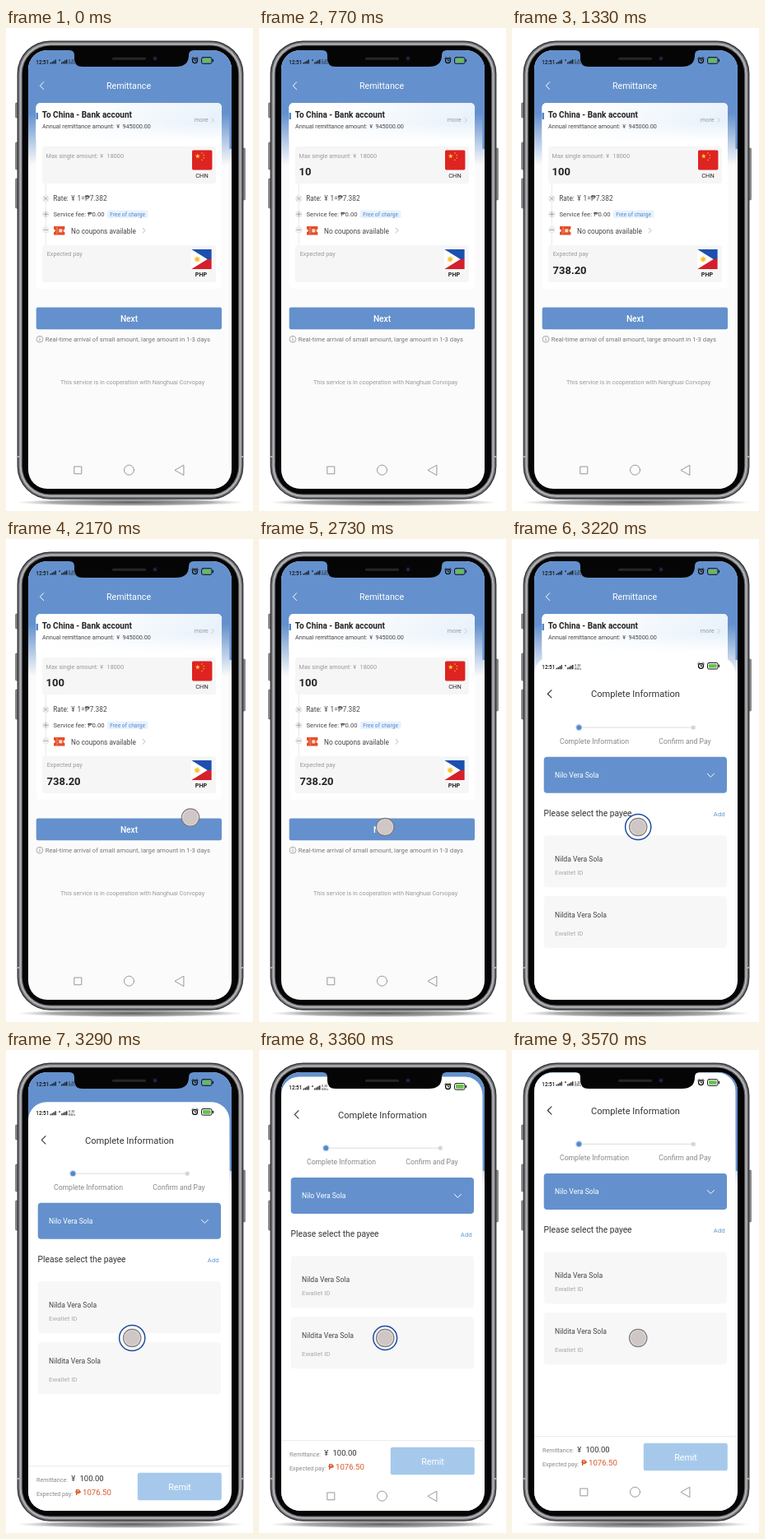
Recreate the animation shown at these times as an HTML page. Size 300 by 587 pixels, loop 7000 ms.

```html
<!DOCTYPE html>
<html lang="en">
<head>
<meta charset="utf-8">
<title>Remittance</title>
<style>
  html, body { margin: 0; width: 100%; height: 100%; overflow: hidden; background: #fff; }
  svg { display: block; width: 100vw; height: 100vh; }
  text { font-family: Roboto, "Noto Sans", sans-serif; font-size: 7.25px; fill: #444; white-space: pre; }
  .b { font-weight: 700; }
  .m { font-weight: 500; }
  .c { text-anchor: middle; }
  .w { fill: #fff; }
  .g { fill: #999; }
  .amount { font-size: 13px; font-weight: 700; fill: #222; }
  .row { font-size: 8.25px; }
  .step { font-size: 8.65px; fill: #888; }
  .name { font-size: 8.6px; }
  .id { font-size: 7.9px; fill: #aaa; }
  .sum { font-size: 9.5px; fill: #333; }
  .due { font-size: 9.6px; fill: #d9582b; }
  .line { fill: none; stroke-linecap: round; stroke-linejoin: round; }
</style>
</head>
<body>
<svg viewBox="0 0 300 587">
  <defs>
    <clipPath id="screen"><rect x="27" y="27" width="247" height="533" rx="23"/></clipPath>
    <linearGradient id="sky" x1="0" x2="0" y1="0" y2="1">
      <stop offset="0" stop-color="#6491cd"/><stop offset=".55" stop-color="#6491cd"/>
      <stop offset="1" stop-color="#fbfbfb"/>
    </linearGradient>
    <linearGradient id="tint" x1="0" x2="1" y1="0" y2=".25">
      <stop offset=".25" stop-color="#fff"/><stop offset="1" stop-color="#e9f2fb"/>
    </linearGradient>
    <linearGradient id="fade" x1="0" x2="0" y1="0" y2="1">
      <stop offset=".3" stop-color="#fff" stop-opacity="0"/><stop offset="1" stop-color="#fff"/>
    </linearGradient>
    <radialGradient id="shade">
      <stop offset="0" stop-color="#444" stop-opacity=".85"/><stop offset=".7" stop-color="#666" stop-opacity=".55"/>
      <stop offset="1" stop-color="#999" stop-opacity="0"/>
    </radialGradient>

    <g id="status">
      <text x="36.3" y="43.5" class="m" style="font-size:6.3px;fill:#111">12:51</text>
      <path d="M54.2 43.5v-1.6M56.2 43.5v-2.6M58.2 43.5v-3.8M60.2 43.5v-5M67.8 43.5v-2M69.8 43.5v-3M71.8 43.5v-4.2M73.8 43.5v-5.2M65 38.3v1.8" stroke="#111" stroke-width="1.3"/>
      <text x="76" y="40.6" style="font-size:3.8px;fill:#222">0.20</text>
      <text x="76" y="44" style="font-size:3.8px;fill:#222">KB/s</text>
      <g class="line" stroke="#111">
        <circle cx="229.5" cy="39.6" r="3" stroke-width="1.3"/>
        <path d="M229.5 38v1.8h1.2M225.7 37l1.6-1.5M233.3 37l-1.6-1.5" stroke-width="1"/>
        <rect x="237.5" y="35.7" width="12.5" height="7.6" rx="1.8" stroke-width="1"/>
        <path d="M251.4 38.4v2.2" stroke-width="1.2"/>
      </g>
      <rect x="239" y="37.2" width="9.5" height="4.6" rx=".6" fill="#67c04c"/>
    </g>
    <g id="nav" class="line" stroke="#8d8d8d" stroke-width=".9">
      <rect x="83.2" y="533" width="8.6" height="8.8"/>
      <circle cx="149.5" cy="537.2" r="6"/>
      <path d="M205.3 537.2l10.6-6v12z"/>
    </g>
    <path id="star" d="M0-1L.225-.309.951-.309.363.118.588.809 0 .382-.588.809-.363.118-.951-.309-.225-.309z"/>
  </defs>

  <ellipse cx="151" cy="576.5" rx="139" ry="4.6" fill="url(#shade)"/>
  <g fill="#8a8a8a" stroke="#555" stroke-width=".5">
    <rect x="11.5" y="91" width="3.5" height="18" rx="1"/>
    <rect x="11.5" y="139" width="3.5" height="33" rx="1"/>
    <rect x="11.5" y="183" width="3.5" height="36" rx="1"/>
    <rect x="286.5" y="146" width="4" height="63" rx="1"/>
  </g>
  <g id="body"></g>
  <path d="M13.6 521h4M284 521h4" stroke="#aaa" stroke-width="2"/>

  <g clip-path="url(#screen)">
    <rect x="27" y="27" width="247" height="533" fill="#fbfbfb"/>
    <rect x="27" y="27" width="247" height="140" fill="url(#sky)"/>
    <path d="M271.5 29h2.5v118h-2.5z" fill="#6491cd"/>
    <use href="#status"/>
    <path class="line" d="M45.6 65.8l-4.2 4.4 4.2 4.4" stroke="#fff" stroke-width="1"/>
    <text x="149" y="74.3" class="c w" style="font-size:10.7px">Remittance</text>

    <rect x="36.5" y="91.2" width="225.5" height="225.8" rx="5" fill="#fff"/>
    <rect x="36.5" y="91.2" width="225.5" height="45" rx="5" fill="url(#tint)"/>
    <rect x="36.5" y="106" width="225.5" height="31" fill="url(#fade)"/>
    <rect x="36.5" y="103" width="2.5" height="8" fill="#5685c8"/>
    <text x="43.8" y="109.2" class="b" style="font-size:10px;fill:#222">To China - Bank account</text>
    <text x="44" y="122.3">Annual remittance amount:</text>
    <text x="134.2" y="122.3">¥</text><text x="141.4" y="122.3">945000.00</text>
    <text x="228.7" y="114.3" class="g" style="font-size:7.4px">more</text>
    <path class="line" d="M250 109.3l2.4 2.6-2.4 2.6" stroke="#bbb" stroke-width=".7"/>

    <path d="M48.3 188v76" stroke="#e3e3e3" stroke-width=".8"/>
    <g fill="#f6f6f6">
      <rect x="44" y="144" width="211" height="45" rx="3"/>
      <rect x="44" y="264" width="211" height="45" rx="3"/>
    </g>
    <text x="48.6" y="158.3" class="g">Max single amount:</text>
    <text x="114.2" y="158.3" class="g">¥</text><text x="122.6" y="158.3" class="g">18000</text>
    <text id="typed" x="48.6" y="179.3" class="amount"></text>
    <rect x="226" y="148.4" width="24.4" height="24" rx="1.6" fill="#dd2421"/>
    <g fill="#fbd433">
      <use href="#star" transform="translate(232.8 155.8) scale(3.2)"/>
      <use href="#star" transform="translate(238 152) scale(1.1)"/>
      <use href="#star" transform="translate(240.3 154.5) scale(1.1)"/>
      <use href="#star" transform="translate(240.2 157.9) scale(1.1)"/>
      <use href="#star" transform="translate(237.9 160.4) scale(1.1)"/>
    </g>
    <text x="238" y="182" class="c" style="font-size:7.4px;fill:#222">CHN</text>

    <g fill="#f1f1f1" stroke="#ddd" stroke-width=".5">
      <circle cx="48.3" cy="207.3" r="3.8"/><circle cx="48.3" cy="226.3" r="3.8"/><circle cx="48.3" cy="245.3" r="3.8"/>
    </g>
    <path class="line" d="M46.5 205.5l3.6 3.6m0-3.6l-3.6 3.6M45.7 226.3h5.2m-2.6-2.6v5.2M45.9 245.3h4.8" stroke="#888" stroke-width=".7"/>
    <text x="57.2" y="210.4" class="row">Rate:</text>
    <text x="79.3" y="210.4" class="row">¥</text><text x="86.6" y="210.4" class="row">1=₱7.382</text>
    <text x="57.5" y="228.8" style="font-size:7.7px">Service fee: ₱0.00</text>
    <rect x="123" y="221.4" width="49.5" height="9.6" rx="1.5" fill="#e8f2fc"/>
    <text x="126.3" y="228.6" style="font-size:6.7px;fill:#5189d0">Free of charge</text>
    <path d="M58 241h13.4v3.4a1.7 1.7 0 0 0 0 3.6v3.6H58V248a1.7 1.7 0 0 0 0-3.6z" fill="#e44d27"/>
    <path d="M62 242.3v8" stroke="#fff" stroke-width=".7" stroke-dasharray="1.4 1"/>
    <rect x="64.3" y="244.3" width="4" height="4" fill="#fbd9c9"/>
    <text x="79" y="249.5" class="row">No coupons available</text>
    <path class="line" d="M166.2 243.2l2.8 3-2.8 3" stroke="#aaa" stroke-width=".8"/>

    <text x="49.7" y="277.3" class="g">Expected pay</text>
    <text id="total" x="49.5" y="299.4" class="amount">738.20</text>
    <rect x="225" y="269" width="24.6" height="24" rx=".8" fill="#fff"/>
    <path d="M225.3 269h24.3v12h-5z" fill="#1c4fae"/>
    <path d="M225.3 293h24.3v-12h-5z" fill="#d4202b"/>
    <circle cx="232.2" cy="281" r="2.6" fill="#f6c431"/>
    <path d="M232.2 276.8v8.4M228 281h8.4M229.2 278l6 6m0-6l-6 6" stroke="#f6c431" stroke-width=".7"/>
    <text x="237" y="302" class="c b" style="font-size:7.2px;fill:#222">PHP</text>

    <rect x="36.7" y="339.4" width="225.3" height="26.8" rx="2.2" fill="#6491cd"/>
    <text x="149.5" y="356.7" class="c m w" style="font-size:10.2px">Next</text>
    <circle cx="41" cy="378.2" r="3.9" fill="none" stroke="#888" stroke-width=".7"/>
    <path d="M41 377.4v3M41 375.6v.9" stroke="#888" stroke-width=".8"/>
    <text x="47.8" y="381" style="font-size:7.7px;fill:#777">Real-time arrival of small amount, large amount in 1-3 days</text>
    <text x="66" y="433.3" class="g" style="font-size:7.3px">This service is in cooperation with Nanghuai Corvopay</text>
    <use href="#nav"/>

    <g id="sheet">
      <path d="M27 560V49.5a22 22 0 0 1 22-22h200.5a22 22 0 0 1 22 22V560z" fill="#fff"/>
      <use href="#status"/>
      <path class="line" d="M48 68.8l-4.7 4.7 4.7 4.7" stroke="#333" stroke-width="1.1"/>
      <text x="150" y="77.7" class="c" style="font-size:11.1px;fill:#333">Complete Information</text>
      <path d="M81 114.3h139" stroke="#dcdcdc" stroke-width="1"/>
      <circle cx="81.3" cy="114.3" r="4.2" fill="#c5d8f0"/>
      <circle cx="81.3" cy="114.3" r="2.9" fill="#5588cc"/>
      <circle cx="220.2" cy="114.3" r="2.6" fill="#d6d6d6"/>
      <text x="100" y="133.8" class="c step">Complete Information</text>
      <text x="210" y="133.8" class="c step">Confirm and Pay</text>

      <rect x="38.7" y="150" width="222.3" height="44" rx="4" fill="#6491cd"/>
      <text x="52" y="175.2" class="name w">Nilo Vera Sola</text>
      <path class="line" d="M237.3 170.5l4.1 4 4.1-4" stroke="#fff" stroke-width="1"/>
      <text x="38.5" y="222" style="font-size:10.25px;fill:#333">Please select the payee</text>
      <text x="244.8" y="221.8" style="font-size:7.8px;fill:#5f9bd3">Add</text>

      <g fill="#f7f7f7">
        <rect x="38.7" y="245.5" width="222.3" height="63" rx="4"/>
        <rect x="38.7" y="319.3" width="222.3" height="63" rx="4"/>
      </g>
      <text x="52" y="277.3" class="name">Nilda Vera Sola</text>
      <text x="52" y="293.3" class="id">Ewallet ID</text>
      <text x="52" y="345" class="name">Nildita Vera Sola</text>
      <text x="52" y="367.2" class="id">Ewallet ID</text>

      <path d="M27 469.7h244.5" stroke="#eee" stroke-width="1.2"/>
      <text x="37" y="488.8" style="font-size:7.15px;fill:#888">Remittance:</text>
      <text x="79.3" y="488.5" class="sum">¥</text><text x="89.5" y="488.5" class="sum">100.00</text>
      <text x="37" y="505.8" style="font-size:7.15px;fill:#888">Expected pay:</text>
      <text x="84" y="505" class="due b">₱</text><text x="93" y="505" class="due">1076.50</text>
      <rect x="159.8" y="477.8" width="102" height="33.5" rx="2.5" fill="#a6c9eb"/>
      <text x="211" y="498.7" class="c w" style="font-size:10.7px">Remit</text>
      <use href="#nav"/>
    </g>

    <g id="touch">
      <circle id="ring" fill="none" stroke="#1d4c9f" stroke-width="1.5"/>
      <circle r="10.7" fill="#e0dada" fill-opacity=".95" stroke="#7d7a7c" stroke-width="1.2"/>
      <circle r="9" fill="#cfc6c6"/>
    </g>
  </g>

  <path d="M77 27q6 0 6 6v4q0 10 10 10h113q16 0 16-14q0-6 6-6z" fill="#050505"/>
  <rect x="129" y="35.8" width="41" height="3" rx="1.5" fill="#262626"/>
  <circle cx="181" cy="37" r="2.7" fill="#15182c"/>
  <circle cx="181" cy="37" r="1.2" fill="#2b315c"/>
</svg>
<script>
  const LOOP = 7000, STEP = 70;
  const KEYS = [350, 770, 1190];
  const TRAVEL = 524;
  const POWER = 2.87;
  const RIM = [[0, '#303032'], [1.3, '#737578'], [3, '#b4b6b9'], [5, '#6a6c6f'], [6.2, '#050505']];
  const [body, typed, total, sheet, touch, ring] =
    ['body', 'typed', 'total', 'sheet', 'touch', 'ring'].map(id => document.getElementById(id));

  body.innerHTML = RIM.map(([inset, fill]) =>
    `<rect x="${13.6 + inset}" y="${15.4 + inset}" width="${274.8 - 2 * inset}" ` +
    `height="${557.4 - 2 * inset}" rx="${40 - inset}" fill="${fill}"/>`).join('');

  const span = (t, from, to) => Math.min(1, Math.max(0, (t - from) / (to - from)));
  const ease = p => p < .5 ? (2 * p) ** POWER / 2 : 1 - (2 - 2 * p) ** POWER / 2;
  const mix = (a, b, p) => a + (b - a) * p;
  const show = (el, on) => el.setAttribute('visibility', on ? 'visible' : 'hidden');

  function draw(time) {
    // motion advances in ticks of 70 ms
    const t = Math.floor((time % LOOP) / STEP) * STEP;

    typed.textContent = '100'.slice(0, KEYS.filter(k => t >= k).length);
    show(total, t >= 1330);

    const move = ease(span(t, 2170, 2730));
    touch.setAttribute('transform', `translate(${mix(224, 153.2, move)} ${mix(338.5, 350, move)})`);
    show(touch, t >= 2170);

    const press = span(t, 2730, 3010) - span(t, 3290, 3570);
    ring.setAttribute('r', mix(11, 15.6, press));
    show(ring, press > 0);

    const slide = ease(span(t, 2870, 3430));
    sheet.setAttribute('transform', `translate(0 ${TRAVEL * (1 - slide)})`);
    show(sheet, slide > 0);
  }

  const start = performance.now();
  function tick() {
    draw(performance.now() - start);
    requestAnimationFrame(tick);
  }
  tick();
</script>
</body>
</html>
```
